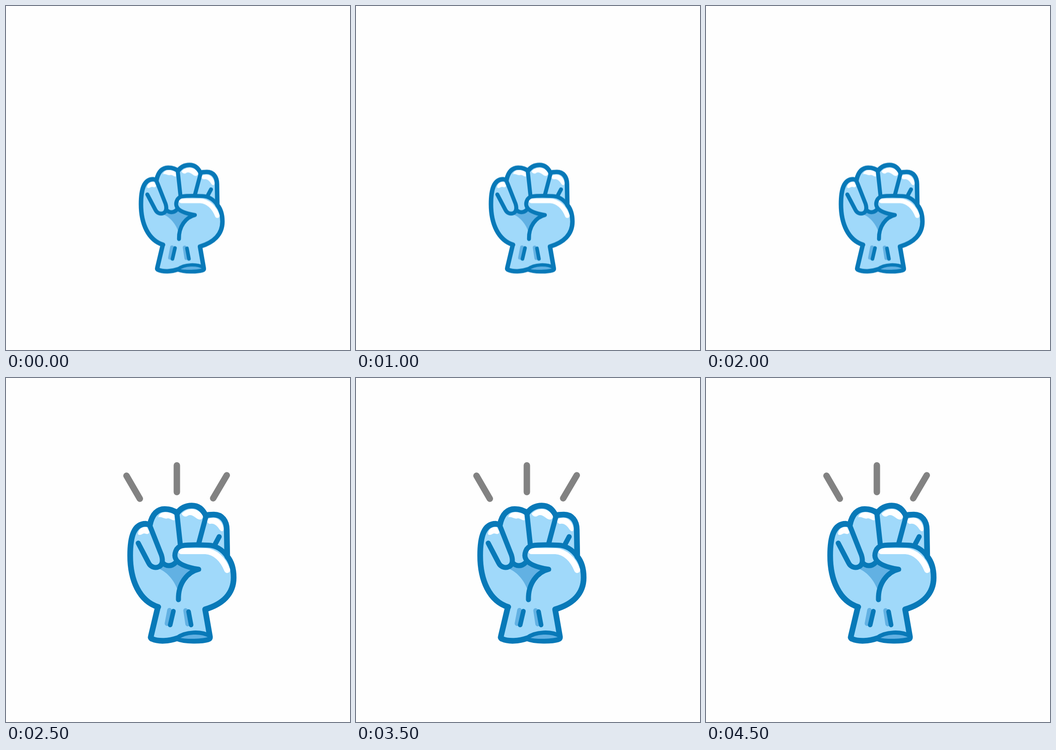
Write an HTML page that moves like this. It is 748 px wide and 748 px high and loops after 5010 ms.

```html
<!DOCTYPE html>
<html lang="en">
<head>
<meta charset="utf-8">
<title>Raised fist</title>
<style>
  html, body { margin: 0; width: 100%; height: 100%; overflow: hidden; background: #fefefe; }
  svg { display: block; width: 100vw; height: 100vh; }
  path { stroke-linecap: round; stroke-linejoin: round; }
  #fist { transform-origin: 0 0; }
  .skin { fill: #a0d9fa; }
  .shade { fill: #62b1e3; }
  .shine { fill: #fff; }
  .line { fill: none; stroke: #0879b8; stroke-width: 11; }
  .outline { stroke: #0879b8; stroke-width: 12.4; }
  .tendon { stroke-width: 10; }
  .soft { stroke: #62b1e3; }
  .gloss { fill: none; stroke: #fff; stroke-width: 13; }
  #rays { fill: none; stroke: #828282; stroke-width: 14; }
</style>
</head>
<body>
<svg viewBox="0 0 748 748">
  <path id="rays" d="M262 212.500L291 262.500M371.500 190V248M480 211.500L450.500 261.500"/>
  <g id="fist">
    <!-- hand and wrist -->
    <path class="skin outline" d="M331 498C290 485 270 440 270 386C270 345 278 317 304 317L313 319C318 295 330 285 345 285C357 285 366 288 372 294C380 283 390 277.500 404 277.500C418 277.500 428 286 434 299C440 297 446 297 452 297C470 297 480 311 480 330L481 388C491 400 495 418 495 434C495 470 470 492 433 503L443.500 563Q444 567 440 568C425 572.500 390 573 372 566C355 572 332 574 317 567Q314 565 315 562L330 499Z"/>
    <path class="shade" d="M328 413C350 420 365 440 372 458C380 440 400 425 412 416L370 404L342 404Z"/>
    <path class="shade" d="M378 565C392 553 425 552 440 563C425 568 392 568 378 565Z"/>

    <!-- highlights -->
    <path class="shine" d="M287 339C288 328 296 323 306 324L312 335C308 344 303 335 297 339C292 342 288 342 287 339ZM331 303C334 290 350 288 366 297L367 309C362 311 358 305 352 305C344 308 338 300 331 303ZM382 295C395 281 418 281 428 300C428 309 420 310 413 304C407 300 402 296 396 299C390 304 384 300 382 295ZM437 308C450 299 468 304 473 326C474 335 468 335 464 329C460 322 452 315 445 317C440 318 436 313 437 308Z"/>
    <path class="gloss" d="M381 376.500L434 376.500C456 378 472 395 481 417.500"/>

    <!-- cuff -->
    <path class="line" style="stroke-width:9" d="M372 565C390 551 425 550 443 561"/>

    <!-- fingers -->
    <path class="line" d="M287.500 359L310 402C315 412 326 414 333 410C342 405 341 395 338 385L312 319M341 402C348 410 360 410 368 402M371.500 293L379 362M435 300L419 360M463.500 345L455 361"/>

    <!-- thumb -->
    <path class="line" d="M481 388C470 372 455 364 440 363.500C415 362.500 395 362.500 384 364.500C368 367 365 385 369 393C374 405 395 412 419 416C394 422 374 447 375 482"/>

    <!-- tendons -->
    <path class="line tendon soft" d="M355.500 505L350 534M390.500 505.500L395 535"/>
    <path class="line tendon" d="M364 507L357 537M397 508L402.500 537"/>
  </g>
</svg>
<script>
  const LOOP = 5010, BEAT = 500;
  const LOW = "translate(81px, 127.2px) scale(.787)";
  const HIGH = "translate(0px, 0px) scale(1)";

  // The poses swap on every beat; the last one holds to the loop's end.
  const beats = Array.from({ length: 10 }, (_, i) => ({ offset: i * BEAT / LOOP, up: i % 2 === 1 }));
  beats.push({ offset: 1, up: true });

  function play(id, pose) {
    const frames = beats.map(({ offset, up }) => ({ offset, easing: "step-end", ...pose(up) }));
    const anim = document.getElementById(id).animate(frames, { duration: LOOP, iterations: Infinity });
    anim.startTime = document.timeline.currentTime;
  }

  play("fist", up => ({ transform: up ? HIGH : LOW }));
  play("rays", up => ({ opacity: up ? 1 : 0 }));
</script>
</body>
</html>
```
